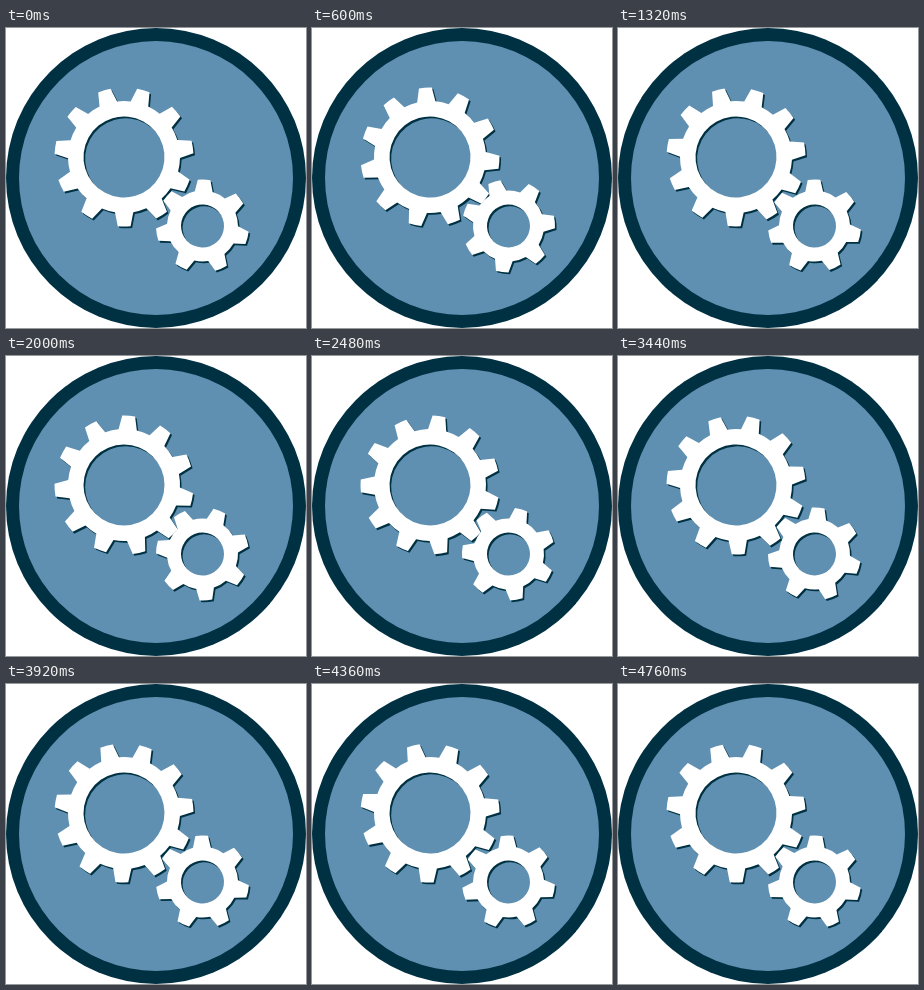
These frames come from a looping animation (300x300 px, 4800 ms). An HTML page:

```html
<!DOCTYPE html>
<html lang="en">
<head>
<meta charset="utf-8">
<title>Turning gears</title>
<style>
  html, body { margin: 0; height: 100%; overflow: hidden; background: #fff; }
  svg { display: block; width: 100vw; height: 100vh; }
</style>
</head>
<body>
<svg viewBox="0 0 300 300">
  <circle cx="150" cy="150" r="150" fill="#003142"/>
  <circle cx="150" cy="150" r="137" fill="#5f90b1"/>
  <g id="shadows" fill="#003142" transform="translate(1.6 1.8)"></g>
  <g id="faces" fill="#fff"></g>
</svg>
<script>
const LOOP = 4800, STEP = 40, LAST = LOOP / STEP - 1;

// Half angles (degrees) give the tooth width at its tip and at its root.
const gears = [
  { x: 118, y: 129, teeth: 11, tip: 69.5, root: 56, hole: 40.5, tipHalf: 5.3, rootHalf: 9.4, start: -16.5, turn: 360 },
  { x: 196.5, y: 198, teeth: 7, tip: 46.5, root: 35.5, hole: 21.5, tipHalf: 7.8, rootHalf: 14.5, start: 2, turn: -360 * 11 / 7 },
];

function point(radius, degrees) {
  const a = degrees * Math.PI / 180;
  return `${(radius * Math.sin(a)).toFixed(2)} ${(-radius * Math.cos(a)).toFixed(2)}`;
}

function outline({ teeth, tip, root, hole, tipHalf, rootHalf }) {
  let d = '';
  for (let i = 0; i < teeth; i++) {
    const a = i * 360 / teeth;
    d += i ? `A${root} ${root} 0 0 1 ` : 'M';
    d += `${point(root, a - rootHalf)}L${point(tip, a - tipHalf)}`;
    d += `A${tip} ${tip} 0 0 1 ${point(tip, a + tipHalf)}L${point(root, a + rootHalf)}`;
  }
  d += `A${root} ${root} 0 0 1 ${point(root, -rootHalf)}Z`;
  const arc = `A${hole} ${hole} 0 0 0 `;
  return `${d}M0 ${-hole}${arc}0 ${hole}${arc}0 ${-hole}Z`;
}

for (const gear of gears) {
  gear.paths = ['shadows', 'faces'].map(id => {
    const path = document.createElementNS('http://www.w3.org/2000/svg', 'path');
    path.setAttribute('d', outline(gear));
    path.setAttribute('fill-rule', 'evenodd');
    return document.getElementById(id).appendChild(path);
  });
}

function draw(now) {
  const progress = Math.floor(now % LOOP / STEP) / LAST;
  for (const { x, y, start, turn, paths } of gears) {
    const pose = `translate(${x} ${y}) rotate(${start + turn * progress})`;
    for (const path of paths) path.setAttribute('transform', pose);
  }
}

function tick() {
  draw(performance.now());
  requestAnimationFrame(tick);
}
tick();
</script>
</body>
</html>
```
